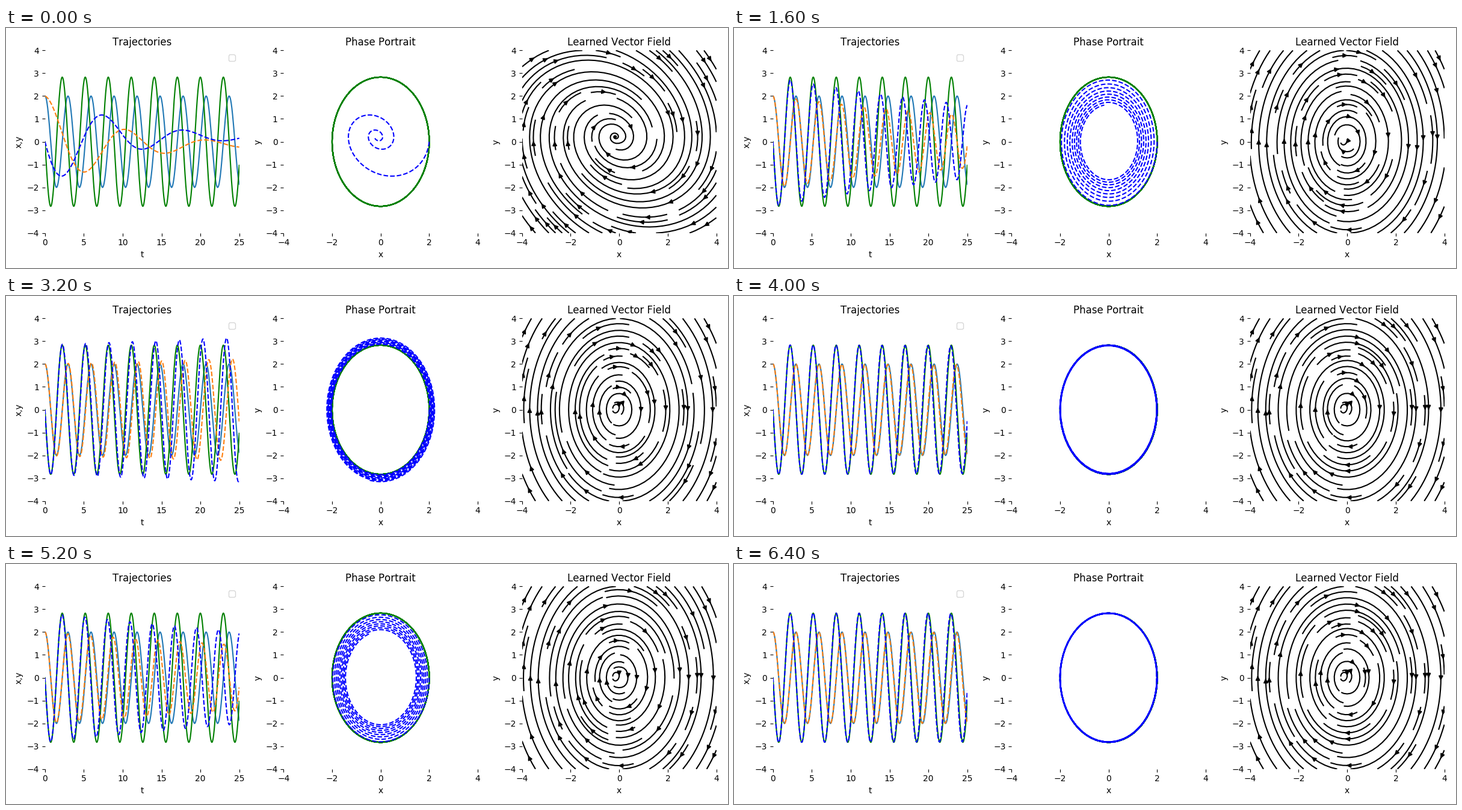
Write a matplotlib script that moves like this. It is 1200 px wide and 400 px high and loops after 6.8 s.

```python
import numpy as np
import matplotlib.pyplot as plt
from matplotlib.animation import FuncAnimation

plt.rcParams["font.family"] = "DejaVu Sans"
plt.rcParams["text.kerning_factor"] = 6

FRAMES, INTERVAL = 17, 400
LIM = 4
LEARN_STEPS = 4
ASPECT = np.sqrt(0.5)
OMEGA = np.sqrt(4.5)

# Training wobbles around the true system: (step, damping, frequency)
KEYS = [(4, 0.0224, 2.100), (6, 0.0074, 2.138), (8, -0.0043, 2.106),
        (10, 0.0006, 2.127), (13, 0.0134, 2.128), (16, 0.0004, 2.127)]

t = np.linspace(0, 25, 1000)
true_x = 2 * np.cos(OMEGA * t)
true_y = -2 / ASPECT * np.sin(OMEGA * t)
grid_y, grid_x = np.mgrid[-LIM:LIM:21j, -LIM:LIM:21j]


def learned_field(step):
    """Vector field at a training step: a tilted spiral that straightens."""
    left = max(0, 1 - step / LEARN_STEPS) ** 2

    def blend(start, end):
        return end + (start - end) * left

    steps, dampings, freqs = zip(*KEYS)
    damping = blend(0.112, np.interp(step, steps, dampings))
    freq = blend(0.607, np.interp(step, steps, freqs))
    gain = blend(0, 0.4)
    alpha = blend(0.18, 0)
    beta = blend(0.98, ASPECT)
    delta = -(1 + alpha ** 2) / beta
    cx, cy = blend(-0.13, -0.005), blend(0.21, 0.003)

    def field(x, y):
        u, v = x - cx, y - cy
        r = np.sqrt(u * u / 4 + v * v / 8)
        w = freq + gain * (1 - np.minimum(r, 1.3))   # small orbits run faster
        return np.array([w * (alpha * u + beta * v) - damping * u,
                         w * (delta * u - alpha * v) - damping * v])

    return field


def integrate(field):
    """Runge-Kutta trajectory from (2, 0)."""
    h = t[1] - t[0]
    path = [np.array([2.0, 0.0])]
    for _ in t[1:]:
        p = path[-1]
        k1 = field(*p)
        k2 = field(*(p + h / 2 * k1))
        k3 = field(*(p + h / 2 * k2))
        k4 = field(*(p + h * k3))
        path.append(p + h / 6 * (k1 + 2 * k2 + 2 * k3 + k4))
    return np.transpose(path)


fig = plt.figure(figsize=(12, 4), dpi=100, facecolor="white")
ax_traj, ax_phase, ax_field = [
    fig.add_subplot(1, 3, i, frameon=False) for i in (1, 2, 3)
]


def label(ax, title, xlabel, ylabel, xlim):
    ax.set_title(title)
    ax.set_xlabel(xlabel)
    ax.set_ylabel(ylabel)
    ax.set_xlim(*xlim)
    ax.set_ylim(-LIM, LIM)


def draw(step):
    field = learned_field(step)
    x, y = integrate(field)
    for ax in (ax_traj, ax_phase, ax_field):
        ax.cla()

    ax_traj.plot(t, true_x, "C0-", t, true_y, "g-")
    ax_traj.plot(t, x, "C1--", t, y, "b--")
    ax_traj.legend([], [], loc="upper right")
    label(ax_traj, "Trajectories", "t", "x,y", (0, 25))

    ax_phase.plot(true_x, true_y, "g-")
    ax_phase.plot(x, y, "b--")
    label(ax_phase, "Phase Portrait", "x", "y", (-LIM, LIM))

    dx, dy = field(grid_x, grid_y)
    size = np.hypot(dx, dy)
    ax_field.streamplot(grid_x, grid_y, dx / size, dy / size, color="black")
    label(ax_field, "Learned Vector Field", "x", "y", (-LIM, LIM))
    return []


draw(0)
fig.tight_layout()
anim = FuncAnimation(fig, draw, frames=FRAMES, init_func=lambda: [],
                     interval=INTERVAL, repeat=True, repeat_delay=0)
plt.show()
```
